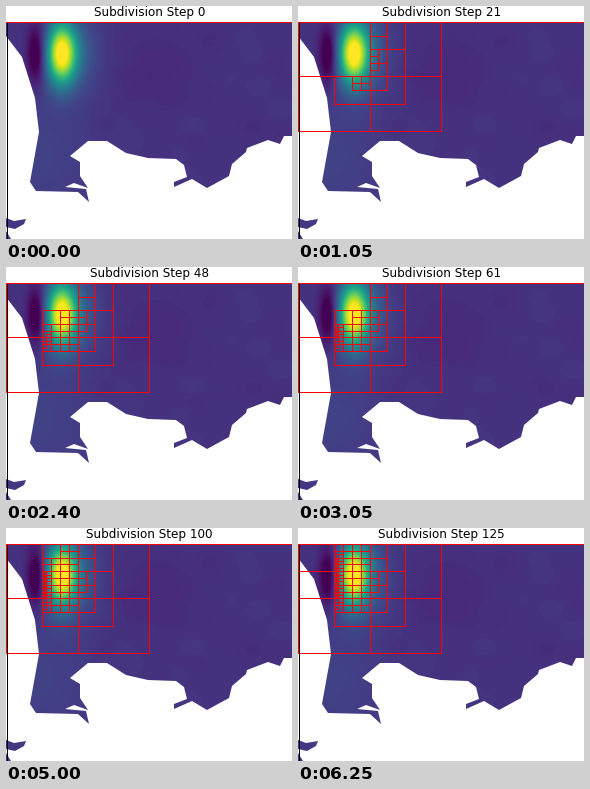
These frames come from a looping animation (286x233 px, 6.3 s). A matplotlib script:

```python
import numpy as np
import matplotlib.pyplot as plt
from matplotlib.animation import FuncAnimation
from matplotlib.patches import PathPatch
from matplotlib.path import Path

W, H, DPI = 286, 233, 72
LEFT, TOP, SPAN_X, SPAN_Y = 0.5, 16.1, 284.4, 217.2
INTERVAL = 50
RED = (1, 0, 0, 1)
BLACK = (0, 0, 0, 1)

# Cells of each level worth drawing: ellipse centre and radii, in cell units
ZONES = [(0, 0, 0.9, 0.9), (0.5, 0.5, 0.9, 0.9), (1.4, 1, 1.5, 1.1),
         (3, 2, 1.9, 2.9), (5.2, 4.9, 2.85, 7), (8.2, 10.45, 1.7, 8.5),
         (17, 19.5, 0.9, 12)]

# Key points of the shoreline, from the right edge round to the left one
COAST = [(0, 16), (286, 16), (286, 130), (278, 130), (274, 138), (262, 134),
         (241, 142), (240, 146), (226, 158), (223, 170), (201, 182),
         (186, 173), (168, 181), (168, 176), (181, 171), (178, 159),
         (170, 153), (142, 152), (120, 147), (101, 135), (82, 135),
         (64, 150), (74, 156), (74, 170), (82, 182), (68, 177), (59, 181),
         (80, 183), (83, 196), (72, 186), (30, 185), (24, 176), (33, 126),
         (29, 92), (16, 51), (0, 30)]
ISLET = [(0, 212), (8, 215), (20, 213), (18, 218), (9, 223), (0, 221)]
CORNER = [(0, 225), (5, 233), (0, 233)]


def visit(level=0, i=0, j=0):
    """Walk the quadtree depth first: right before left, lower before upper."""
    if level == len(ZONES):
        return
    ci, cj, ri, rj = ZONES[level]
    for di in (1, 0):
        for dj in (1, 0):
            ki, kj = 2 * i + di, 2 * j + dj
            if ((ki - ci) / ri) ** 2 + ((kj - cj) / rj) ** 2 < 1:
                yield level + 1, ki, kj
                yield from visit(level + 1, ki, kj)


def outline(layer, level, i, j):
    n = 2 ** level
    x0, x1 = (round(LEFT + SPAN_X * k / n) for k in (i, i + 1))
    y0, y1 = (round(TOP + SPAN_Y * k / n) for k in (j, j + 1))
    for y in (y0, y1):
        layer[y:y + 1, x0:x1 + 1] = RED
    for x in (x0, x1):
        layer[y0:y1 + 1, x:x + 1] = RED
    layer[17:, 1] = BLACK


def build_layers():
    layer = np.zeros((H, W, 4))
    layer[16] = RED
    layer[17:, 1] = BLACK
    layers = [layer.copy()]
    for cell in visit():
        outline(layer, *cell)
        layers.append(layer.copy())
    return layers


def field():
    x, y = np.meshgrid(np.arange(W), np.arange(H))

    def bump(cx, cy, sx, sy):
        return np.exp(-((x - cx) / sx) ** 2 / 2 - ((y - cy) / sy) ** 2 / 2)

    z = 0.145 + 0.78 * bump(55, 47, 10, 21) + 0.2 * bump(64, 46, 17, 25)
    z -= 0.25 * bump(30, 48, 6.5, 20)
    z -= 0.03 * bump(150, 70, 32, 28)
    z += 0.05 * bump(30, 150, 45, 50)
    rng = np.random.default_rng(4)
    for _ in range(60):
        cx, cy = rng.uniform(80, W), rng.uniform(20, 180)
        z += rng.uniform(-0.012, 0.012) * bump(cx, cy, 9, 7)
    return z


def sea_path():
    return Path.make_compound_path(
        *(Path(p + p[:1], closed=True) for p in (COAST, ISLET, CORNER)))


fig = plt.figure(figsize=(W / DPI, H / DPI), dpi=DPI, facecolor="white")
ax = fig.add_axes([0, 0, 1, 1])
ax.set_xlim(0, W)
ax.set_ylim(H, 0)
ax.axis("off")

box = dict(extent=(0, W, H, 0), aspect="auto", interpolation="nearest")
sea = ax.imshow(field(), cmap="viridis", vmin=0, vmax=1, **box)
sea.set_clip_path(PathPatch(sea_path(), transform=ax.transData))

layers = build_layers()
grid = ax.imshow(layers[0], zorder=3, **box)
title = ax.text(143.5, 10, "", ha="center", va="baseline", fontsize=12,
                family="DejaVu Sans", color="black")


def update(step):
    grid.set_data(layers[step])
    title.set_text(f"Subdivision Step {step}")
    return grid, title


anim = FuncAnimation(fig, update, frames=len(layers), interval=INTERVAL,
                     repeat=True, repeat_delay=0, blit=False)
plt.show()
```
